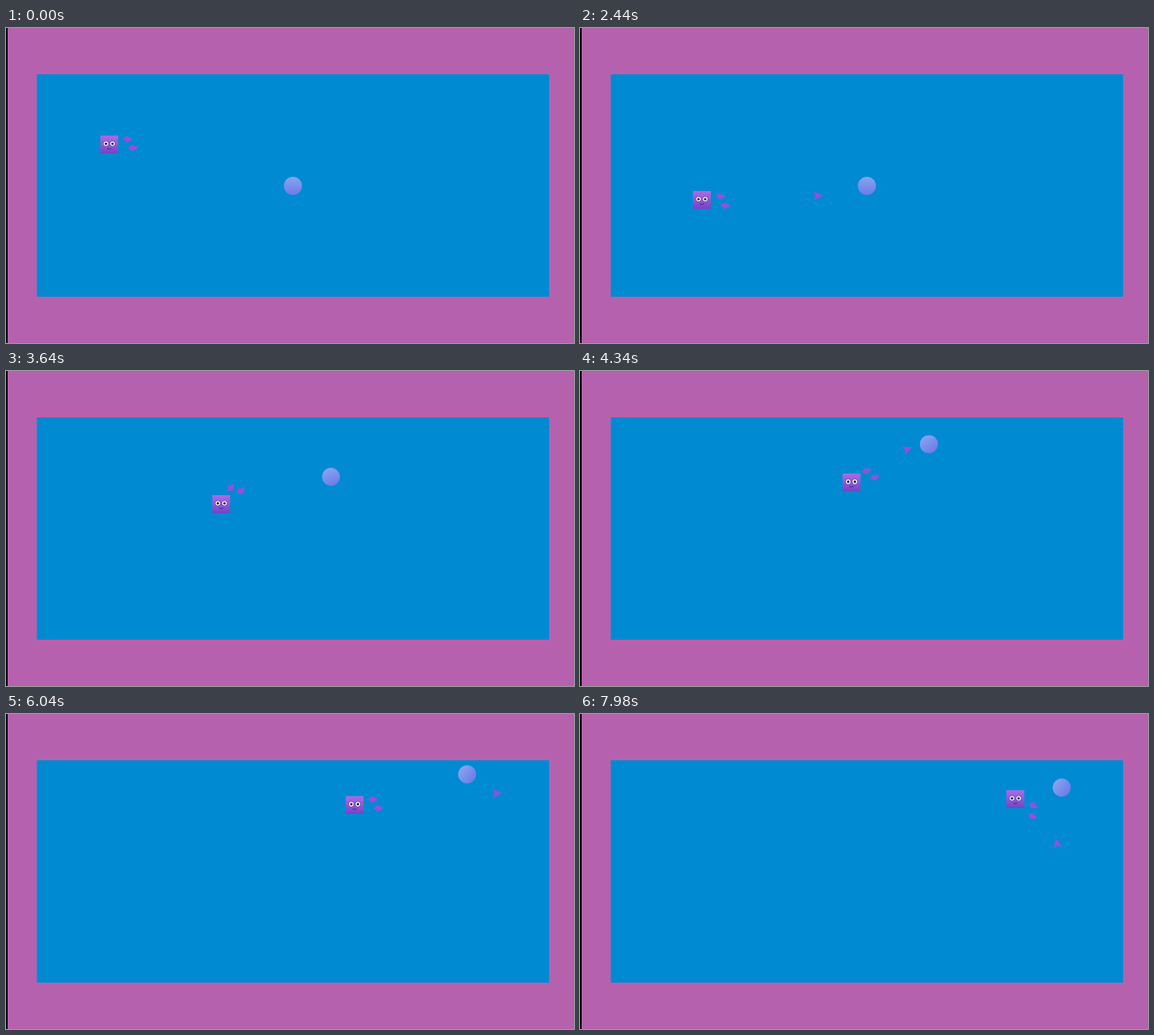
Animation, 685 px wide and 381 px high, one loop 8000 ms. Source, as an HTML page with a canvas:

```html
<!DOCTYPE html>
<html lang="en">
<head>
<meta charset="utf-8">
<title>Arena</title>
<style>
html, body { margin: 0; width: 100%; height: 100%; overflow: hidden; background: #b661ad; }
canvas { display: block; width: 685px; height: 381px; }
</style>
</head>
<body>
<canvas id="stage" width="685" height="381"></canvas>
<script>
const ctx = document.getElementById("stage").getContext("2d");
const LOOP = 8000, STEP = 20, RAD = Math.PI / 180;
const DRAG = 0.00015, WALL = 644;
const SHOT_SPEED = 0.29, SPIN = -0.1, BURST = 90;

// waypoints: time, x, y, swing of the held darts in degrees
const route = [
  [260, 124.5, 141, 0], [560, 96, 170, 12], [1040, 116, 199, 43],
  [1900, 132, 208, 6], [2440, 147, 208, 6], [2720, 169, 210, -8],
  [3640, 259.5, 161, -42], [5020, 393.5, 109.5, 0], [6000, 417, 111, 0],
  [6900, 494, 91, 0], [7640, 500, 98, 25], [7980, 525, 103, 37]
];

// each kick sets a new velocity, in pixels per ms
const kicks = [
  { t: 2655, vx: 0.0502, vy: -0.0688 },
  { t: 4410, vx: 0.0918, vy: -0.0082 },
  { t: 7060, vx: 0.0964, vy: 0.0257 }
];

// a shot flies straight to its hit, then tumbles to its end
const shots = [
  { t: 2040, angle: -2, hit: [2610, 336, 201], end: [3300, 313, 205] },
  { t: 4110, angle: -22, hit: [4410, 413, 87], end: [5000, 410, 72.5] },
  { t: 5460, angle: -4, hit: [6235, 648, 92], end: [6236, 648, 92] },
  { t: 6715, angle: -8, hit: [7060, 606, 69], end: [8000, 574.5, 159] }
];

const mix = (a, b, p) => a.map((v, i) => v + (b[i] - v) * p);

function heroAt(t) {
  const i = route.findIndex(k => k[0] > t);
  if (i < 1) return route[i ? route.length - 1 : 0];
  const a = route[i - 1], b = route[i];
  return mix(a, b, (t - a[0]) / (b[0] - a[0]));
}

function ballAt(t) {
  let x = 346, y = 191;
  kicks.forEach((k, i) => {
    const next = kicks[i + 1] ? kicks[i + 1].t : LOOP;
    const age = Math.max(0, Math.min(t, next) - k.t);
    const reach = (1 - Math.exp(-DRAG * age)) / DRAG;
    x += k.vx * reach;
    y += k.vy * reach;
  });
  return { x: WALL - Math.abs(WALL - x), y, turn: -Math.min(55, Math.max(0, t - kicks[0].t) * 0.022) };
}

function place(x, y, deg, draw) {
  ctx.save();
  ctx.translate(x, y);
  ctx.rotate(deg * RAD);
  draw();
  ctx.restore();
}

function poly(points, fill) {
  ctx.beginPath();
  points.forEach(p => ctx.lineTo(p[0], p[1]));
  ctx.closePath();
  ctx.fillStyle = fill;
  ctx.fill();
}

function line(color, width, ...points) {
  ctx.beginPath();
  points.forEach(p => ctx.lineTo(p[0], p[1]));
  ctx.strokeStyle = color;
  ctx.lineWidth = width;
  ctx.stroke();
}

function disc(x, y, r, fill) {
  ctx.beginPath();
  ctx.arc(x, y, r, 0, 7);
  ctx.fillStyle = fill;
  ctx.fill();
}

function rect(fill, x, y, w, h) {
  ctx.fillStyle = fill;
  ctx.fillRect(x, y, w, h);
}

function shade(top, bottom) {
  const g = ctx.createLinearGradient(0, -11, 0, 11);
  g.addColorStop(0, top);
  g.addColorStop(1, bottom);
  return g;
}

function face() {
  rect(shade("#aa6ce8", "#7444c4"), -10.8, -10.8, 21.6, 21.6);
  for (const x of [-4, 4]) {
    disc(x, -1, 3.3, "#56379a");
    disc(x, -1, 2.8, "#fff");
    disc(x, -1, 1.6, "#2c2448");
  }
  line("#4c2a7c", 1, [-2.5, 4.5], [0, 5.5], [2.5, 4.5]);
}

const heldDart = () => poly([[-6, 0], [0, -4.8], [0.5, -2.3], [6, -1.8], [4, 1.6], [1, 2.4], [0, 4.6], [-3, 2]], "#9650d6");
const flyingDart = () => poly([[6.5, 0], [-5.5, -5.5], [-2, 0], [-5.5, 5.5]], "#9b4ddb");

function burst() {
  line("#fff", 5, [-5, -3], [6, 6]);
  line("#fff", 2.5, [-5, -8], [-3, -2], [4, -4]);
  line("#fff", 2.5, [1, 5], [4, 1], [8, 8]);
}

function drawShot({ t: start, angle, hit, end }, t) {
  if (t < start || t >= end[0] + BURST) return;
  if (t >= end[0]) return place(end[1], end[2], 0, burst);
  const late = Math.max(0, t - hit[0]);
  const ahead = Math.max(0, hit[0] - t) * SHOT_SPEED;
  const [, x, y] = mix(hit, end, late / (end[0] - hit[0]));
  place(x - ahead * Math.cos(angle * RAD), y - ahead * Math.sin(angle * RAD), angle + late * SPIN, flyingDart);
}

function paint(t) {
  rect("#b661ad", 0, 0, 685, 381);
  rect("#000", 0, 0, 2, 381);
  rect("#008ad2", 37, 56, 618, 269);

  const ball = ballAt(t);
  place(ball.x, ball.y, ball.turn, () => disc(0, 0, 10.9, shade("#86a4ee", "#6d7ce6")));

  const [, x, y, swing] = heroAt(t);
  for (const [r, a] of [[23, -17], [29, 8]]) {
    const q = (a + swing) * RAD;
    place(x + r * Math.cos(q), y + r * Math.sin(q), swing, heldDart);
  }
  place(x, y, 0, face);
  shots.forEach(s => drawShot(s, t));
}

const start = performance.now();
function tick() {
  const t = (performance.now() - start) % LOOP;
  paint(Math.floor(t / STEP) * STEP);
  requestAnimationFrame(tick);
}
tick();
</script>
</body>
</html>
```
